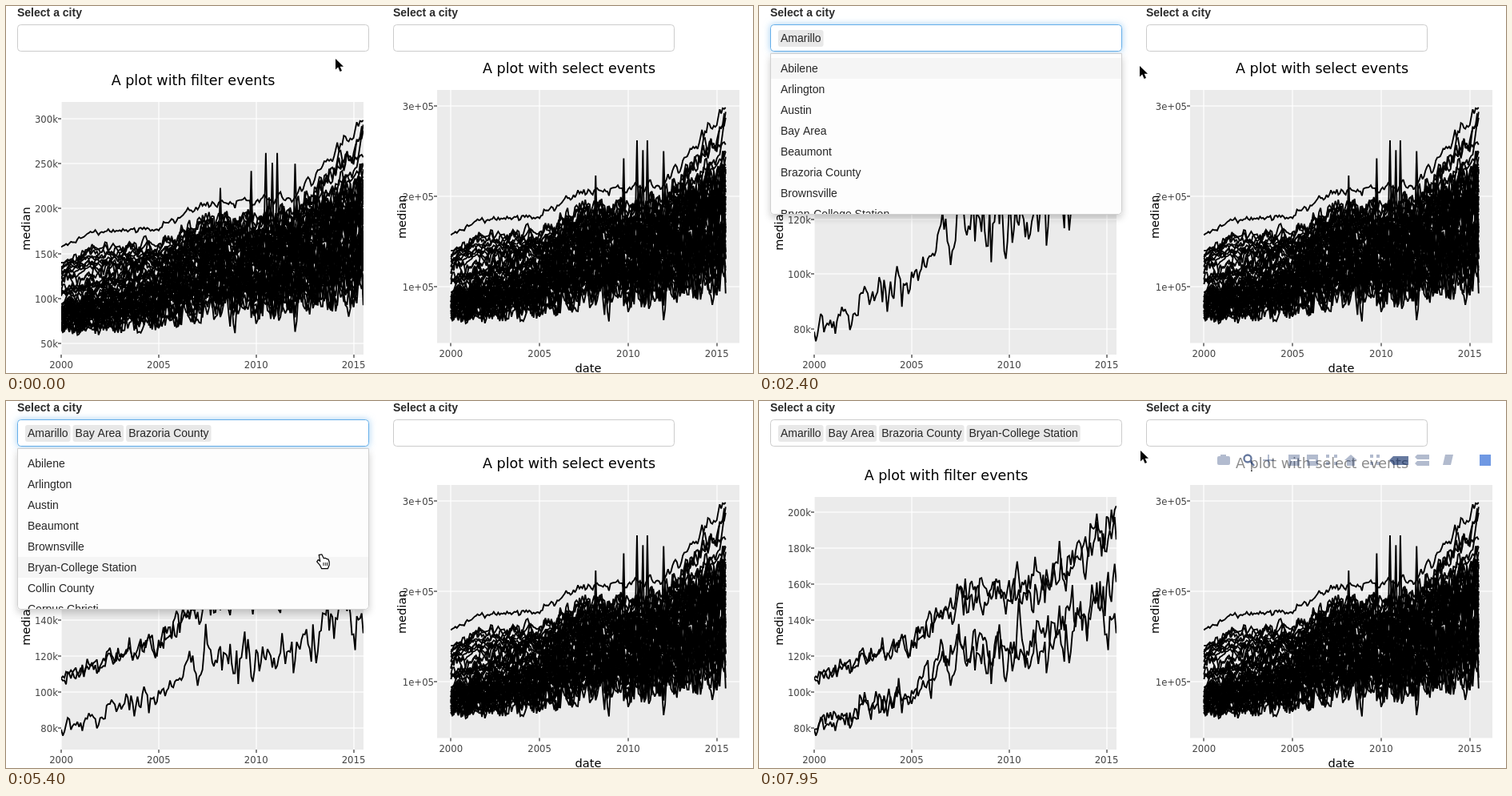
Animation of 934x459 px, one loop 8000 ms. Source, as an HTML page with a canvas:

```html
<!DOCTYPE html>
<html lang="en">
<head>
<meta charset="utf-8">
<title>Linked city plots</title>
<style>
html, body { margin: 0; width: 100%; height: 100%; overflow: hidden; background: #fff; }
canvas { display: block; width: 934px; height: 459px; }
</style>
</head>
<body>
<canvas id="stage" width="934" height="459"></canvas>
<script>
const ctx = document.getElementById('stage').getContext('2d');
const LOOP = 8000, STEP = 150, LAST = 186;
const UI = '"Liberation Sans", Arial, sans-serif';
const PLOT = '"DejaVu Sans", Verdana, sans-serif';

// ---------- data ----------
let seed = 4711;
function rand() {
  seed = (seed * 1664525 + 1013904223) >>> 0;
  return seed / 4294967296;
}

const mix = (a, b, p) => a + (b - a) * p;

function along(knots, x) {
  let i = 0;
  while (i < knots.length - 2 && x >= knots[i + 1][0]) i++;
  const [a, b] = [knots[i], knots[i + 1]];
  return mix(a[1], b[1], (x - a[0]) / (b[0] - a[0]));
}

// Share of the total rise reached by month: an even market and one that booms at the end.
const steady = [[0, 0], [60, 0.26], [90, 0.56], [132, 0.58], [LAST, 1]];
const booming = [[0, 0], [20, 0.12], [60, 0.15], [86, 0.33], [144, 0.4], [LAST, 1]];

// Monthly prices: a trend, a yearly swing and noise that grows with time.
function city(start, end, wobble, trend = steady) {
  let drift = 0;
  return Array.from({ length: LAST + 1 }, (_, m) => {
    const size = wobble * (0.5 + 1.2 * m / LAST);
    const outlier = rand() < 0.03 ? 1.8 : 1;
    drift = drift * 0.3 + (rand() + rand() - 1) * size * outlier;
    return mix(start, end, along(trend, m)) + drift + Math.sin((m - 2) * Math.PI / 6) * size * 0.3;
  });
}

function group(count, starts, ends, wobble, trend) {
  return Array.from({ length: count }, (_, i) => {
    const p = i / (count - 1);
    return city(mix(...starts, p), mix(...ends, p) + 16 * (rand() - 0.5), wobble * (0.7 + 0.6 * rand()), trend);
  });
}

const named = {
  'Amarillo': city(80, 148, 10),
  'Bay Area': city(107, 194, 10),
  'Brazoria County': city(107, 184, 9),
  'Bryan-College Station': city(81, 160, 12)
};

const spiky = city(104, 222, 12);
const spikes = [[98, 223], [117, 242], [126, 262], [130, 251], [133, 262], [144, 250]];
for (const [month, value] of spikes) spiky[month] = value;

const everyCity = [
  ...Object.values(named),
  ...group(31, [65, 93], [112, 200], 15),
  ...group(7, [95, 119], [190, 232], 15),
  ...group(9, [123, 139], [226, 280], 9, booming),
  city(157, 298, 5, booming),
  spiky
];

// ---------- timeline ----------
// Each glide: start, end, and where the pointer arrives.
const glides = [
  [300, 900, 395, 42], [1050, 1650, 388, 104], [1950, 2400, 476, 75], [2850, 3600, 433, 50], [3600, 3900, 420, 44],
  [3900, 4500, 398, 156], [4650, 4950, 397, 182], [5100, 5550, 396, 208], [6000, 6450, 485, 117],
  [6450, 6900, 484, 98], [7650, 7950, 477, 62]
];
const picks = [[1800, 'Amarillo'], [4500, 'Bay Area'], [4950, 'Brazoria County'], [5700, 'Bryan-College Station']];
const menuTimes = [[750, 2550], [3750, 6600]];
const cities = ['Abilene', 'Amarillo', 'Arlington', 'Austin', 'Bay Area', 'Beaumont', 'Brazoria County', 'Brownsville',
  'Bryan-College Station', 'Collin County', 'Corpus Christi', 'Dallas', 'Denton County'];

const ease = p => p * p * (3 - 2 * p);

function cursorAt(t) {
  let x = 412, y = 66;
  for (const [from, to, toX, toY] of glides) {
    const p = ease(Math.min(1, Math.max(0, (t - from) / (to - from))));
    x = mix(x, toX, p);
    y = mix(y, toY, p);
  }
  return { x: Math.round(x), y: Math.round(y) };
}

function pointerFor({ x, y }, open) {
  if (x > 454) return arrow;
  if (y < 58) return beam;
  return open ? hand : arrow;
}

// ---------- drawing helpers ----------
function text(str, x, y, font, color, align = 'left') {
  ctx.font = font;
  ctx.fillStyle = color;
  ctx.textAlign = align;
  ctx.fillText(str, x, y);
}

function box(x, y, w, h, r, fill, stroke) {
  ctx.beginPath();
  ctx.roundRect(x, y, w, h, r);
  ctx.fillStyle = fill;
  ctx.fill();
  if (!stroke) return;
  ctx.strokeStyle = stroke;
  ctx.lineWidth = 1;
  ctx.stroke();
}

function rect(x, y, w, h, color) {
  ctx.fillStyle = color;
  ctx.fillRect(x, y, w, h);
}

function clipped(x, y, w, h, paint) {
  ctx.save();
  ctx.beginPath();
  ctx.rect(x, y, w, h);
  ctx.clip();
  paint();
  ctx.restore();
}

function outlined(path, fill, stroke, width) {
  const shape = new Path2D(path);
  ctx.strokeStyle = stroke;
  ctx.lineWidth = width;
  ctx.stroke(shape);
  ctx.fillStyle = fill;
  ctx.fill(shape);
}

// ---------- plots ----------
function plot({ left, top, height, x0, year, base, baseY, scale, top: _, tickMax, tickStep, label, lines, title, titleX }) {
  const width = 378, bottom = top + height, small = '11.69px ' + PLOT;
  const yOf = v => baseY - (v - base) * scale;
  const xOf = m => x0 + m * year / 12;
  const years = [0, 5, 10, 15];
  const ticks = [];
  for (let v = base; v <= tickMax; v += tickStep) ticks.push(v);

  rect(left, top, width, height, '#ebebeb');
  for (const v of ticks) rect(left, Math.round(yOf(v)) - 0.6, width, 1.2, '#fff');
  for (const y of years) rect(Math.round(xOf(y * 12)) - 0.6, top, 1.2, height, '#fff');

  clipped(left, top, width, height, () => {
    ctx.strokeStyle = '#000';
    ctx.lineWidth = 1.9;
    ctx.miterLimit = 2;
    for (const line of lines) {
      ctx.beginPath();
      line.forEach((v, m) => ctx.lineTo(xOf(m), yOf(v)));
      ctx.stroke();
    }
  });

  for (const v of ticks) {
    const y = Math.round(yOf(v));
    rect(left - 4, y - 0.6, 4, 1.2, '#333');
    text(label(v), left - 4, y + 5, small, '#444', 'right');
  }
  for (const y of years) {
    const x = xOf(y * 12);
    rect(Math.round(x) - 0.6, bottom, 1.2, 4, '#333');
    text(2000 + y, x, bottom + 17, small, '#444', 'center');
  }
  text(title, titleX, top - 21, '17.53px ' + PLOT, '#000', 'center');
  ctx.save();
  ctx.translate(left - 39, top + height / 2 + 0.5);
  ctx.rotate(-Math.PI / 2);
  text('median', 0, 0, '14.6px ' + PLOT, '#000', 'center');
  ctx.restore();
}

function leftPlot(chosen) {
  const views = [
    { base: 50, baseY: 422, scale: 1.124, tickMax: 300, tickStep: 50 },
    { base: 80, baseY: 404, scale: 3.4375, tickMax: 160, tickStep: 20 },
    { base: 80, baseY: 408.6, scale: 2.25, tickMax: 200, tickStep: 20 }
  ];
  plot({
    ...views[Math.min(chosen.length, 2)],
    left: 69, top: 120, height: 316, x0: 69, year: 24.37, label: v => v + 'k',
    lines: chosen.length ? chosen.map(name => named[name]) : everyCity,
    title: 'A plot with filter events', titleX: 234
  });
}

function rightPlot() {
  plot({
    base: 100, baseY: 351, scale: 1.13, tickMax: 300, tickStep: 100,
    left: 539, top: 105, height: 316.5, x0: 556.3, year: 22.16, label: v => v / 100 + 'e+05',
    lines: everyCity, title: 'A plot with select events', titleX: 704
  });
  text('date', 728, 458, '14.6px ' + PLOT, '#000', 'center');
}

// ---------- controls ----------
function field(x, w, focused) {
  text('Select a city', x, 13, 'bold 14px ' + UI, '#2b2b2b');
  ctx.save();
  if (focused) {
    ctx.shadowColor = 'rgba(102,175,233,.6)';
    ctx.shadowBlur = 8;
  }
  box(x, 23, w, 34, 4, '#fff');
  ctx.restore();
  box(x + 0.5, 23.5, w - 1, 33, 4, '#fff', focused ? '#66afe9' : '#ccc');
}

function tags(chosen) {
  let x = 24;
  for (const name of chosen) {
    ctx.font = '14px ' + UI;
    const w = ctx.measureText(name).width + 6;
    box(x, 30, w, 21, 3, '#e8e8e8');
    text(name, x + 3, 45, ctx.font, '#262626');
    x += w + 3;
  }
}

function menu(chosen, cursor) {
  const rowTop = 65, rowHeight = 26, corners = [0, 0, 4, 4];
  ctx.save();
  ctx.shadowColor = 'rgba(0,0,0,.2)';
  ctx.shadowBlur = 10;
  ctx.shadowOffsetY = 4;
  box(14, 60, 440, 201, corners, '#fff');
  ctx.restore();
  box(14.5, 59.5, 439, 201, corners, '#fdfdfd', '#d0d0d0');
  const active = cursor.x < 480 ? Math.floor((cursor.y - rowTop) / rowHeight) : -1;
  clipped(15, 60, 438, 200, () => {
    cities.filter(name => !chosen.includes(name)).forEach((name, i) => {
      const y = rowTop + i * rowHeight;
      if (i === active) rect(15, y, 438, rowHeight, '#f5f5f5');
      text(name, 27, y + 18, '14px ' + UI, '#262626');
    });
  });
}

function modebar() {
  const pale = 'rgba(0,31,95,.3)', dark = 'rgba(0,31,95,.6)';
  rect(570, 65, 352, 22, 'rgba(255,255,255,.55)');
  box(573, 69, 16, 11, 2, pale);
  rect(577, 67, 7, 2, pale);
  ctx.beginPath();
  ctx.arc(611, 72, 4.5, 0, 7);
  ctx.moveTo(614, 75);
  ctx.lineTo(619, 81);
  ctx.strokeStyle = dark;
  ctx.lineWidth = 2.4;
  ctx.stroke();
  rect(636, 67, 2, 14, pale);
  rect(630, 73, 14, 2, pale);
  for (const x of [662, 685]) {
    rect(x, 67, 14, 14, pale);
    rect(x + 3, 73, 8, 2, '#fff');
  }
  for (const x of [709, 719, 764, 772]) for (const y of [67, 76]) rect(x, y, 4, 4, pale);
  ctx.fillStyle = pale;
  ctx.fill(new Path2D('M732 74 l8 -7 8 7 h-3 v7 h-10 v-7z M820 70 l3 -3 h15 v6 h-15z M820 78 l3 -3 h15 v6 h-15z M858 67 h10 l-3 13 h-10z'));
  ctx.fillStyle = dark;
  ctx.fill(new Path2D('M788 74 l5 -5 h19 v11 h-19z'));
  rect(901, 67, 14, 14, '#6f98e3');
}

// ---------- pointers ----------
function arrow() {
  outlined('M0 0 v13.5 l3.2 -2.9 2.4 5.4 2.4 -1 -2.3 -5.3 h4.3z', '#000', '#fff', 2);
}

function beam() {
  const shape = 'M-3.5 -7 Q0 -7 0 -4.5 Q0 -7 3.5 -7 M0 -5 V5 M-3.5 7 Q0 7 0 4.5 Q0 7 3.5 7 M-2 2.5 H2';
  outlined(shape, 'transparent', '#fff', 3);
  outlined(shape, 'transparent', '#222', 1.3);
}

function hand() {
  outlined('M-4 -8 l2.5 -.5 2.5 5 2 -.5 1.5 1 2 .5 1 2.5 v4 l-1.5 4 h-7 l-2 -4 -3.5 -4 1 -1.5 3 2z', '#fff', '#000', 2.4);
  for (const x of [0.5, 2.8, 5]) rect(x, 1, 0.9, 4, '#000');
}

// ---------- frame ----------
function draw(t) {
  const cursor = cursorAt(t);
  const chosen = picks.filter(([at]) => t >= at).map(([, name]) => name);
  const open = menuTimes.some(([from, to]) => t >= from && t < to);

  rect(0, 0, 934, 459, '#fff');
  leftPlot(chosen);
  rightPlot();
  field(14, 440, open);
  field(484, 352, false);
  tags(chosen);
  if (open) {
    menu(chosen, cursor);
    if (!chosen.length && t >= 900) rect(27, 33, 1, 15, '#222');
  }
  if (t >= 6750) modebar();

  ctx.save();
  ctx.translate(cursor.x, cursor.y);
  pointerFor(cursor, open)();
  ctx.restore();
}

let shown = -1;
function tick() {
  const step = Math.floor(performance.now() % LOOP / STEP);
  if (step !== shown) draw((shown = step) * STEP);
  requestAnimationFrame(tick);
}
tick();
</script>
</body>
</html>
```
